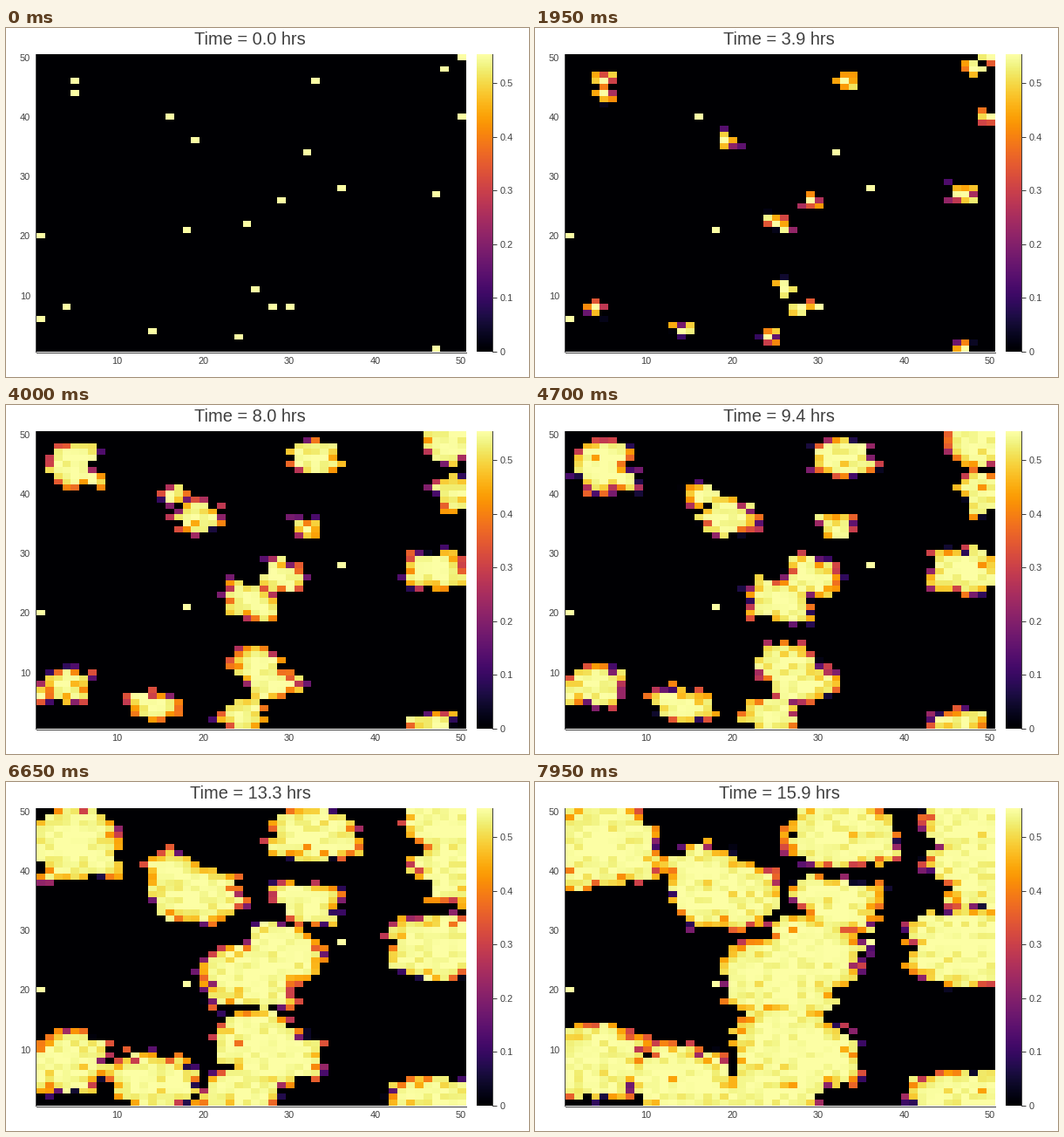
Write a matplotlib script that moves like this. It is 600 px wide and 400 px high and loops after 8 s.

```python
import numpy as np
import matplotlib.pyplot as plt
from matplotlib.animation import FuncAnimation

W, H = 600, 400
N = 50
FRAMES, STEP_MS = 160, 50
PEAK = 0.5536
INK = "#404040"
LEFT, RIGHT, TOP, BOTTOM = 35, 528, 30, 371

# (column, row) of the cells that are full at time zero
ACTIVE = [(5, 46), (5, 44), (19, 36), (33, 46), (48, 48), (50, 50), (50, 40),
          (47, 27), (47, 1), (29, 26), (25, 22), (26, 11), (28, 8), (24, 3),
          (14, 4), (4, 8)]
LATE = [(16, 40), (32, 34), (30, 8), (1, 6)]
DORMANT = [(18, 21), (1, 20), (36, 28)]
LATE_START = 3.5

rng = np.random.default_rng(4)


def spread():
    """Hour at which each cell is first reached, passing from cell to cell."""
    delay = rng.uniform(1.4, 4.2, (N, N))
    reached = np.full((N, N), 1e3)
    for start, seeds in ((0, ACTIVE), (LATE_START, LATE)):
        for x, y in seeds:
            reached[y - 1, x - 1] = start
    steps = [(i, j) for i in (-1, 0, 1) for j in (-1, 0, 1) if i or j]
    for _ in range(2 * N):
        padded = np.pad(reached, 1, constant_values=1e3)
        for i, j in steps:
            near = padded[1 + i:N + 1 + i, 1 + j:N + 1 + j]
            cost = delay * (1.25 if i and j else 1)
            reached = np.minimum(reached, near + cost)
    return reached


arrival = spread()
tau = rng.uniform(0.4, 1.3, (N, N))
level = 1 - 0.06 * rng.random((N, N)) ** 4
dip_time = arrival + rng.uniform(2, 30, (N, N))
dip_depth = rng.uniform(0.05, 0.35, (N, N))

for x, y in ACTIVE + LATE + DORMANT:
    arrival[y - 1, x - 1] = -50
    level[y - 1, x - 1] = 1
    dip_time[y - 1, x - 1] = 99


def density(t):
    """Each reached cell fills up, and dips briefly when it divides."""
    filled = 1 - np.exp(-np.maximum(t - arrival, 0) / tau)
    since = t - dip_time
    dip = np.where(since > 0, dip_depth * np.exp(-np.maximum(since, 0) / 0.7), 0)
    return PEAK * level * filled * (1 - dip)


plt.rcParams["font.family"] = "Liberation Sans"
fig = plt.figure(figsize=(W / 100, H / 100), dpi=100, facecolor="white")


def box(x0, x1):
    ax = fig.add_axes([x0 / W, 1 - BOTTOM / H, (x1 - x0) / W, (BOTTOM - TOP) / H])
    ax.set_xticks([])
    ax.set_yticks([])
    for spine in ax.spines.values():
        spine.set_visible(False)
    return ax


def show_spine(ax, side, outward=0):
    ax.spines[side].set(visible=True, linewidth=0.72, color=INK)
    ax.spines[side].set_position(("outward", outward))


def label(x, y, text, size=11, ha="center"):
    return fig.text(x / W, 1 - y / H, text, fontsize=size * 0.72,
                    color=INK, ha=ha, va="baseline")


plot = box(LEFT, RIGHT)
image = plot.imshow(density(0), cmap="inferno", vmin=0, vmax=PEAK, origin="lower",
                    extent=(0.5, N + 0.5, 0.5, N + 0.5), aspect="auto",
                    interpolation="nearest")
show_spine(plot, "left", 0.65)
show_spine(plot, "bottom", 0.65)
plot.set_xticks([])
plot.set_yticks([])
for n in range(10, N + 1, 10):
    label(LEFT - 1 + (n - 0.5) * (RIGHT - LEFT) / N, 385, str(n))
    label(28, BOTTOM - (n - 0.5) * (BOTTOM - TOP) / N + 4.3, str(n), ha="right")

bar = box(540, 558)
bar.imshow(np.linspace(0, PEAK, 256)[:, None], cmap="inferno", vmin=0, vmax=PEAK,
           origin="lower", extent=(0, 1, 0, PEAK), aspect="auto")
show_spine(bar, "right")
bar.yaxis.tick_right()
bar.set_yticks(np.arange(6) / 10, [""] * 6)
bar.tick_params(length=3.6, width=0.72, color=INK)
for k in range(6):
    y = BOTTOM - k / 10 / PEAK * (BOTTOM - TOP)
    label(566.5, y + 4, f"{k / 10:g}", ha="left")

title = label(280, 19, "", size=20)


def draw(i):
    t = i / 10
    image.set_data(density(t))
    title.set_text(f"Time = {t:.1f} hrs")
    return image, title


anim = FuncAnimation(fig, draw, frames=FRAMES, interval=STEP_MS,
                     repeat=True, repeat_delay=0, blit=False)
plt.show()
```
